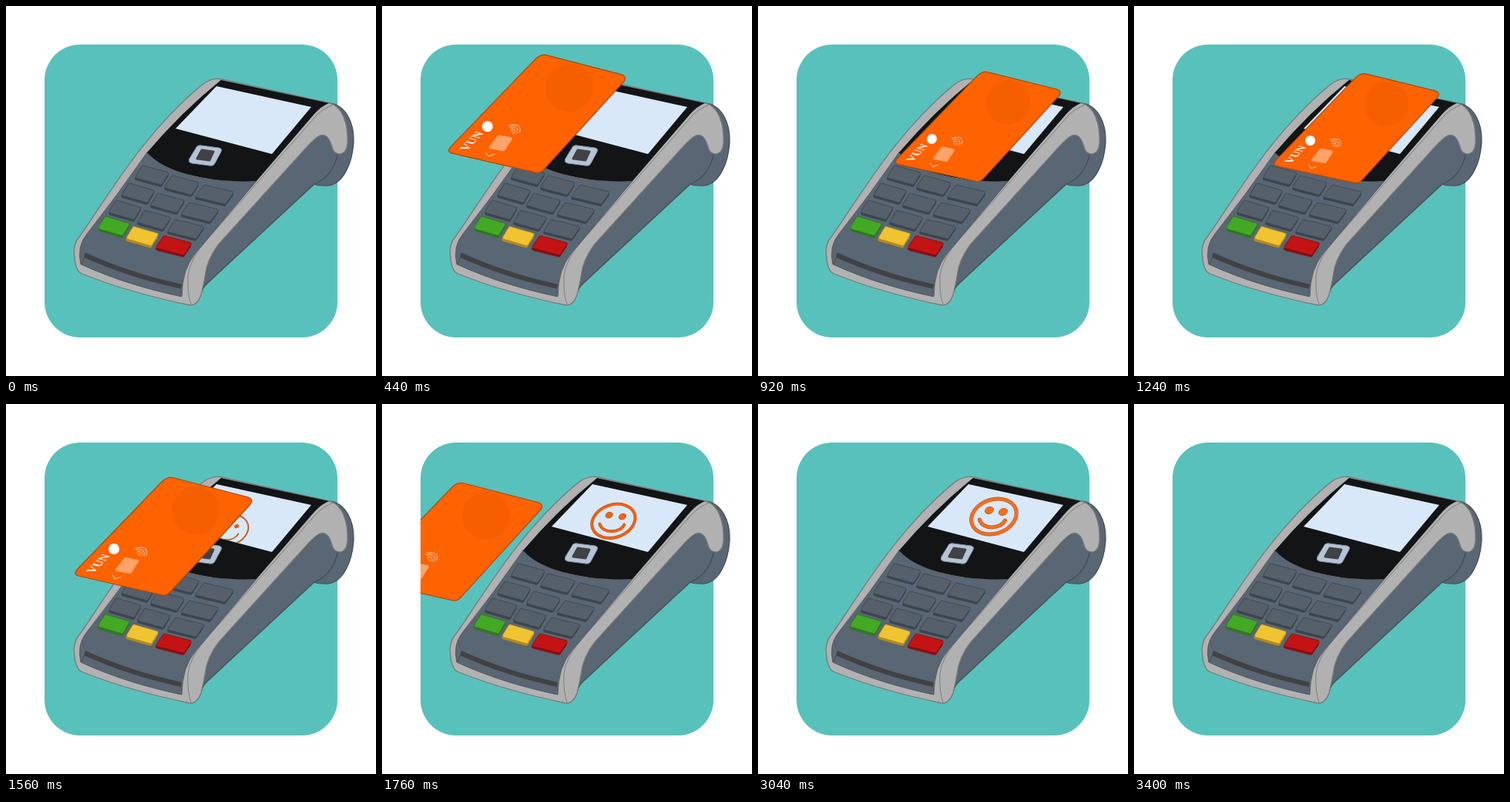
Recreate the animation shown at these times as an HTML page. Size 480 px wide and 480 px high, loop 4 s.

```html
<!DOCTYPE html>
<html lang="en">
<head>
<meta charset="utf-8">
<title>Contactless payment</title>
<style>
html, body { margin: 0; width: 100%; height: 100%; overflow: hidden; background: #fff; }
svg { display: block; width: 100vw; height: 100vh; }
</style>
</head>
<body>
<svg viewBox="0 0 480 480" stroke-linejoin="round" stroke-linecap="round">
  <defs>
    <clipPath id="tile"><rect x="50" y="50" width="380" height="380" rx="46"/></clipPath>
    <clipPath id="glass"><path d="M273 104L396 131 345 192 220 159Z"/></clipPath>
  </defs>
  <rect x="50" y="50" width="380" height="380" rx="46" fill="#58c1bb"/>

  <!-- paper roll and side -->
  <g fill="#596673" stroke="#474e56" stroke-width="1.2">
    <path d="M420 126C439 128 452 149 451 177C449 206 437 230 419 233Q408 234 398 231L395 170Z"/>
    <path d="M418 150L431 190Q424 222 400 231L262 359Q255 365 254 371L244 386 240 340 330 225Z"/>
  </g>

  <!-- grey shell -->
  <path d="M280 95L420 126C436 130 444 152 443 177Q442 192 432 192Q425 191 423 183C420 172 415 165 407 168Q400 172 391 182L283 301Q266 318 260 340Q257 359 253 375Q248 389 238 388C190 378 145 366 100 348Q90 345 89 326Q86 309 97 297C134 244 178 166 252 104Q266 92 280 95Z" fill="#b1b1b1" stroke="#77797b" stroke-width="1.3"/>
  <path d="M425 128Q412 132 401 144L262 302Q238 328 236 350Q235 374 240 387" fill="none" stroke="#7d7f81"/>

  <!-- front face -->
  <path d="M183 190C214 222 270 230 325 227L247 319Q228 341 228 377C184 368 138 354 97 335Q92 312 104 297Q145 245 183 190Z" fill="#596673" stroke="#54585c"/>
  <path d="M279 96L419 126Q409 130 400 140L325 227C270 230 207 218 183 190Q228 137 279 96Z" fill="#121416"/>
  <path d="M273 104L396 131 345 192 220 159Z" fill="#d8e8f8"/>
  <path d="M103 320C142 338 184 351 228 361L227 367C182 357 140 344 101 326Z" fill="#404244"/>
  <path d="M102 325L98 334" fill="none" stroke="#474e56"/>
  <path d="M253 181L276 184Q281 185 279 189L271 204Q269 208 264 207L241 204Q236 203 238 198L246 185Q248 180 253 181Z" fill="#b4c4d4" stroke="#8495a6"/>
  <path d="M254 187L269 189 264 200 248 198Z" fill="#414246" stroke="#414246" stroke-width="3"/>
  <g id="keys"></g>

  <g clip-path="url(#glass)">
    <g id="smile">
      <g id="lines" fill="none"></g>
      <g id="eyes" fill="#ff6200" stroke="#b9480e" stroke-width=".8"></g>
    </g>
  </g>

  <g clip-path="url(#tile)">
    <g id="card">
      <path d="M213 63.5L310 88.5Q319 91 314 98L211 211Q205 218 198 215.5L91 191Q84 189 89 183L199 69Q206 62 213 63.5Z" fill="#ff6200" stroke="#ad480c" stroke-width="1.2"/>
      <circle cx="243" cy="106" r="31" fill="#f65f00"/>
      <text transform="matrix(.69 -.72 .96 .27 110 188)" font-family="'Liberation Serif', serif" font-weight="700" font-size="15" fill="#fff">VUN</text>
      <circle cx="137" cy="156" r="7" fill="#fff"/>
      <path d="M152 169L167 172 158 186 141 183Z" fill="#ffa36a" stroke="#ffa36a" stroke-width="4"/>
      <path d="M135 190L139 195 146 192" fill="none" stroke="#ffb48a" stroke-width="1.3"/>
      <path d="M168 163Q171 162 170 165M167 160Q174 158 173 165M166 157Q178 155 176 165M165 155Q182 151 179 164" fill="none" stroke="#ffb48a" stroke-width="1.3"/>
    </g>
  </g>
</svg>
<script>
const LOOP = 4000, STEP = 40;
const $ = id => document.getElementById(id);
const lerp = (a, b, p) => a + (b - a) * p;
const clamp = p => Math.min(1, Math.max(0, p));

const ease = {
  lin: p => p,
  in: p => p * p,
  out: p => 1 - (1 - p) ** 3,
  both: p => p * p * (3 - 2 * p)
};

function drawKeys() {
  const rows = [[189, 220], [171, 243], [154, 265], [139.5, 286]];
  const cols = [[0, 0, 1], [38.5, 13, 1.03], [81, 25, 1.15]];
  const tints = [['#43a824', '#2c781a'], ['#f0c330', '#b28a22'], ['#c41314', '#850e11']];
  let out = '';
  rows.forEach(([x, y], r) => cols.forEach(([dx, dy, w], c) => {
    const [top, edge] = r === 3 ? tints[c] : ['#56606a', '#3c454e'];
    const k = w * (1 - r * .025);
    const px = x + dx * (1 - r * .014), py = y + dy;
    const pts = [[-11, -11], [20, -2.5], [12, 10], [-19, 1.5]]
      .map(([a, b]) => (px + a * k).toFixed(1) + ',' + (py + b).toFixed(1)).join(' ');
    out += `<polygon points="${pts}" transform="translate(-.5 2.5)" fill="${edge}" stroke="${edge}" stroke-width="4.5"/>` +
      `<polygon points="${pts}" fill="${edge}" stroke="${edge}" stroke-width="4.5"/>` +
      `<polygon points="${pts}" fill="${top}" stroke="${top}" stroke-width="3"/>`;
  }));
  $('keys').innerHTML = out;
}

// time, centre x, centre y, lift above the terminal, easing towards this pose
const poses = [
  [80, -70, 133, 1],
  [480, 201.5, 141, 1, 'out'],
  [660, 203, 146.5, 1, 'lin'],
  [940, 286.8, 157, 0, 'both'],
  [1240, 288.7, 159, 0, 'lin'],
  [1340, 279, 156.5, 1, 'in'],
  [1560, 204.5, 172, 1, 'both'],
  [1880, -80, 190, 1, 'in']
];

function cardAt(t) {
  const i = poses.findIndex(p => p[0] >= t);
  if (i < 1) return poses[0];
  const a = poses[i - 1], b = poses[i];
  const p = (t - a[0]) / (b[0] - a[0]), e = ease[b[4]](p);
  return [t, lerp(a[1], b[1], e), lerp(a[2], b[2], i === 1 ? p : e), lerp(a[3], b[3], e)];
}

function drawSmile(t) {
  const shown = t >= 1440 && t < 3400;
  $('smile').style.display = shown ? '' : 'none';
  if (!shown) return;
  const e = ease.out(clamp((t - 1440) / 760));
  const w = lerp(0, 5, e), s = lerp(.8, 1, e);
  const shape = '<ellipse rx="30" ry="22" transform="rotate(-19)"/><path d="M-18.5 4C-15 17 8 17 14.5 5"/>';
  $('lines').innerHTML =
    `<g stroke="#b9480e" stroke-width="${w}">${shape}</g>` +
    `<g stroke="#ff6200" stroke-width="${Math.max(.5, w - 1.4)}">${shape}</g>`;
  const k = lerp(.25, 1, e);
  $('eyes').innerHTML = [[-6, -8], [12, -6]].map(([x, y]) =>
    `<ellipse rx="${5.8 * k}" ry="${4.4 * k}" transform="translate(${x} ${y}) rotate(-25)"/>`).join('');
  $('smile').setAttribute('transform',
    `translate(${lerp(277, 306, e)} ${lerp(176, 146, e)}) scale(${s})`);
  $('smile').setAttribute('opacity', 1 - clamp((t - 3000) / 400));
}

function draw(t) {
  const [, x, y, lift] = cardAt(t);
  const long = lerp(.94, 1, lift), short = lerp(.915, 1, lift);
  $('card').style.display = t >= 120 && t < 1880 ? '' : 'none';
  $('card').setAttribute('transform',
    `translate(${x} ${y}) rotate(-46) scale(${long} ${short}) rotate(46) translate(-201.5 -140)`);
  drawSmile(t);
}

drawKeys();
const start = performance.now();
function tick() {
  const t = (performance.now() - start) % LOOP;
  draw(Math.floor(t / STEP) * STEP);
  requestAnimationFrame(tick);
}
tick();
</script>
</body>
</html>
```
